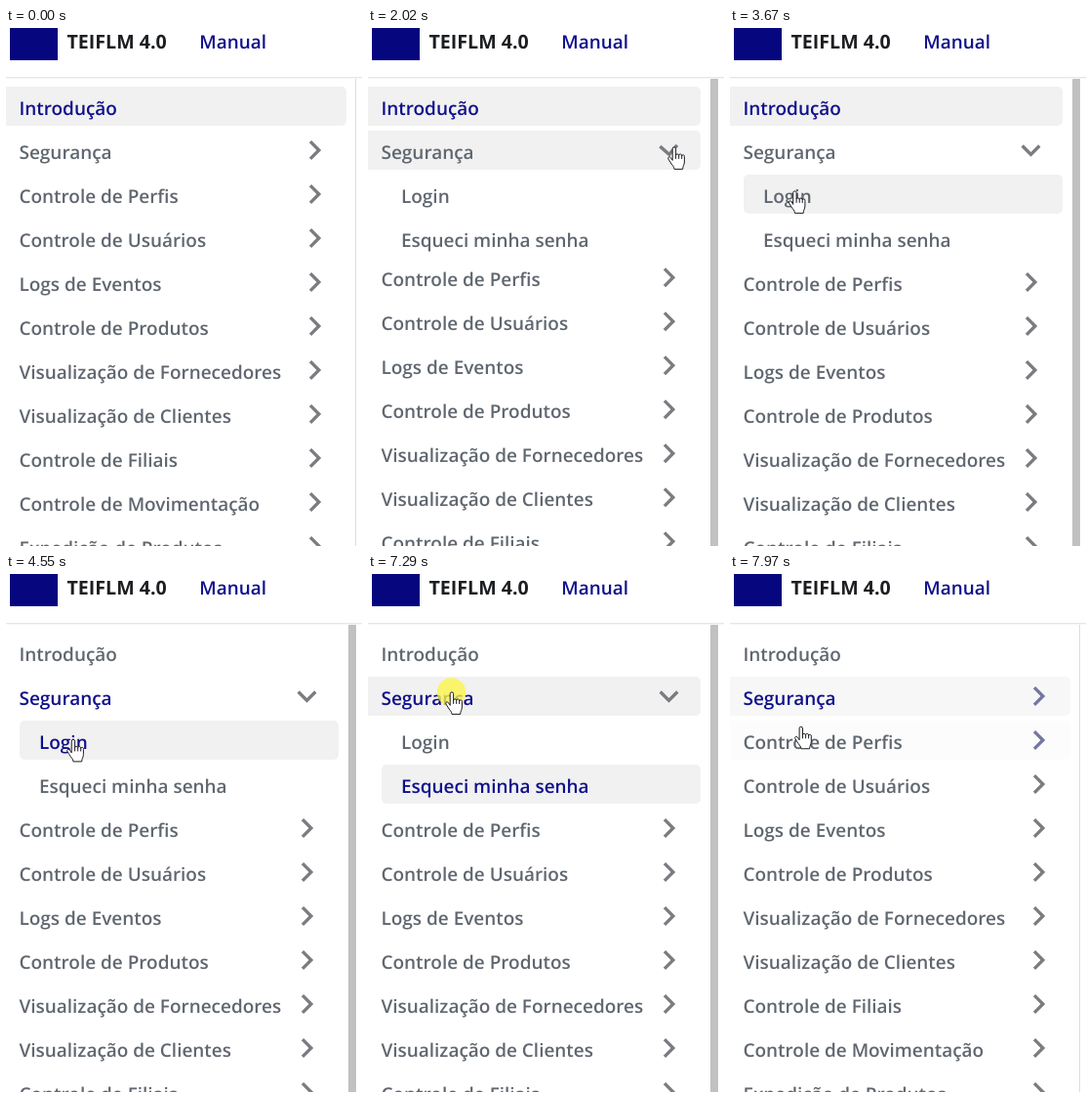
Write an HTML page that moves like this. It is 365x530 px and loops after 8 s.

```html
<!DOCTYPE html>
<html lang="pt">
<head>
<meta charset="utf-8">
<title>Manual</title>
<style>
  html, body { margin: 0; width: 100%; height: 100%; overflow: hidden; background: #fff; }
  svg { display: block; width: 365px; height: 530px; }
  text { font: 600 18.95px "Open Sans", "Noto Sans", sans-serif; text-rendering: geometricPrecision; white-space: pre; }
  .title { font-weight: 700; font-size: 19.6px; }
</style>
</head>
<body>
<svg id="stage" viewBox="0 0 365 530" xmlns="http://www.w3.org/2000/svg">
  <defs>
    <clipPath id="fold"><rect id="foldBox" x="0" y="145" width="365" height="0"/></clipPath>
  </defs>
  <rect width="365" height="530" fill="#fff"/>
  <rect x="358" y="50" width="1" height="480" fill="#dadde1"/>
  <g id="menu"></g>
  <g id="sub" clip-path="url(#fold)"></g>
  <rect id="bar" x="351" y="50" width="8" height="520" rx="4" fill="#c1c1c1"/>
  <rect width="365" height="50" fill="#fff"/>
  <rect y="50" width="365" height="1" fill="#e6e6e6"/>
  <rect y="51" width="365" height="1" fill="#f6f6f6"/>
  <rect x="4" y="-16" width="49" height="49" fill="#06067e"/>
  <text class="title" x="62.5" y="21" fill="#1c1e21">TEIFLM 4.0</text>
  <text x="198.2" y="21" fill="#10108c">Manual</text>
  <circle id="ring" r="14.7" fill="#fcf547" fill-opacity="0.78"/>
  <g id="hand" stroke="#1c1c24" stroke-width="1" stroke-linejoin="round" stroke-linecap="round">
    <path fill="#fff" d="M5.2 14V2.6a1.7 1.7 0 0 1 3.4 0V9a1.6 1.6 0 0 1 3.1.3a1.5 1.5 0 0 1 3 .6a1.4 1.4 0 0 1 2.7.8V16c0 3.2-1.7 4-1.7 7.4H7c0-3-2.8-4.4-4.2-7.4L.9 13c-.9-1.8 1.2-2.9 2.4-1.5z"/>
    <path fill="none" d="M8.6 9v3.5M11.7 9.5v3M14.7 10v2.6"/>
  </g>
</svg>
<script>
const LOOP = 8000, ROW = 45, FOLD = 90;
const NAVY = '#10108c', GREY = '#606770';
const OPEN_AT = 1830, CLOSE_AT = 7420, FOLD_MS = 222;
const LOGIN_AT = 4450, RESET_AT = 5800;
const CLICKS = [[1750, 1840], [4340, 4450], [5640, 5790], [7290, 7420]];

// Pointer path: time, x, y
const PATH = [
  [260, 322, 453], [500, 190, 370], [760, 29, 190], [1020, 143, 121],
  [1410, 306, 122], [1550, 307, 121], [2080, 307, 121], [2500, 193, 172],
  [2900, 110, 204], [3330, 37, 182], [3670, 59.5, 166], [4010, 62, 168],
  [4500, 62, 168], [5100, 62, 204], [5240, 63, 211], [6270, 63, 211],
  [6950, 79, 120], [7850, 79, 120], [8050, 59, 174]
];

const $ = id => document.getElementById(id);
const clamp = v => Math.max(0, Math.min(1, v));
const smooth = v => v * v * (3 - 2 * v);

function make(parent, tag, attrs, text) {
  const el = document.createElementNS('http://www.w3.org/2000/svg', tag);
  set(el, attrs);
  if (text) el.textContent = text;
  return parent.appendChild(el);
}

function set(el, attrs) {
  for (const k in attrs) el.setAttribute(k, attrs[k]);
}

function makeItem(parent, label, x, arrow) {
  const g = make(parent, 'g', {});
  return {
    g, x,
    back: make(g, 'rect', { x: x ? 14 : -6, height: 40, rx: 5 }),
    text: make(g, 'text', { x: x ? 34 : 13.5, y: 29 }, label),
    arrow: arrow && make(g, 'path', { d: 'M7.41 15.41L12 10.83l4.59 4.58L18 14l-6-6-6 6z' })
  };
}

const mainItems = [
  'Introdução', 'Segurança', 'Controle de Perfis', 'Controle de Usuários',
  'Logs de Eventos', 'Controle de Produtos', 'Visualização de Fornecedores',
  'Visualização de Clientes', 'Controle de Filiais', 'Controle de Movimentação',
  'Expedição de Produtos'
].map((label, i) => makeItem($('menu'), label, 0, i > 0));
const subItems = ['Login', 'Esqueci minha senha'].map(label => makeItem($('sub'), label, 14, false));
const items = [...mainItems, ...subItems];

// Monotone cubic interpolation along one axis of the path
function along(t, axis) {
  const n = PATH.length;
  if (t <= PATH[0][0]) return PATH[0][axis];
  if (t >= PATH[n - 1][0]) return PATH[n - 1][axis];
  const slope = i => i < 0 || i > n - 2 ? 0 :
    (PATH[i + 1][axis] - PATH[i][axis]) / (PATH[i + 1][0] - PATH[i][0]);
  const tangent = i => {
    const a = slope(i - 1), b = slope(i);
    return a * b <= 0 ? 0 : 2 * a * b / (a + b);
  };
  let i = 0;
  while (PATH[i + 1][0] <= t) i++;
  const span = PATH[i + 1][0] - PATH[i][0], u = (t - PATH[i][0]) / span, e = smooth(u);
  return PATH[i][axis] * (1 - e) + PATH[i + 1][axis] * e +
    span * u * (1 - u) * ((1 - u) * tangent(i) - u * tangent(i + 1));
}

const openness = t => smooth(clamp((t - OPEN_AT) / FOLD_MS)) - smooth(clamp((t - CLOSE_AT) / FOLD_MS));
const turned = t => clamp((t - OPEN_AT) / 200) - clamp((t - CLOSE_AT) / 200);

function topOf(i, fold) {
  if (i >= mainItems.length) return 150 + (i - mainItems.length) * ROW;
  return 60 + i * ROW + (i > 1 ? fold : 0);
}

function hoveredAt(t) {
  if (t < 280) return -1;
  const y = along(t, 2) + 1, fold = FOLD * openness(t);
  return items.findIndex((item, i) => {
    const top = topOf(i, fold);
    return y >= top && y < top + 40 && (!item.x || top + 40 <= 146 + fold);
  });
}

// Share of the last moments each item was under the pointer
function hoverLevels(t) {
  const levels = items.map(() => 0), steps = 10;
  for (let k = 0; k < steps; k++) {
    const i = hoveredAt(t - k * 9);
    if (i >= 0) levels[i] += 1 / steps;
  }
  return levels;
}

function draw(t) {
  const open = openness(t), fold = FOLD * open, wide = open <= 0.3;
  const right = wide ? 349 : 341, arrowX = wide ? 316.5 : 308.5;
  const login = mainItems.length;
  const active = t < LOGIN_AT ? 0 : t < RESET_AT ? login : login + 1;
  const levels = hoverLevels(t);
  const closedAgain = t > CLOSE_AT + FOLD_MS;

  items.forEach((item, i) => {
    const navy = i === active || (i === 1 && active > 0);
    set(item.g, { transform: `translate(0 ${topOf(i, fold)})` });
    set(item.back, {
      width: right - (item.x ? 14 : -6),
      fill: '#000',
      'fill-opacity': 0.055 * (i === active ? 1 : levels[i])
    });
    set(item.text, { fill: navy ? NAVY : GREY });
    if (item.arrow) {
      const angle = 90 + (i === 1 ? 90 * turned(t) : 0);
      set(item.arrow, {
        transform: `translate(${arrowX} 20) rotate(${angle}) scale(1.667) translate(-12 -12)`,
        fill: closedAgain && (i === 1 || i === 2) ? '#7377a0' : '#7b7b80'
      });
    }
  });

  set($('foldBox'), { height: fold });
  set($('bar'), { visibility: wide ? 'hidden' : 'visible' });

  const x = along(t, 1), y = along(t, 2);
  const pressed = CLICKS.some(([from, to]) => t >= from && t < to);
  set($('hand'), { transform: `translate(${x} ${y})`, visibility: t < 260 ? 'hidden' : 'visible' });
  set($('ring'), { cx: x + 6.5, cy: y + 1, visibility: pressed ? 'visible' : 'hidden' });
}

const start = performance.now();
function tick() {
  draw((performance.now() - start) % LOOP);
  requestAnimationFrame(tick);
}
tick();
</script>
</body>
</html>
```
